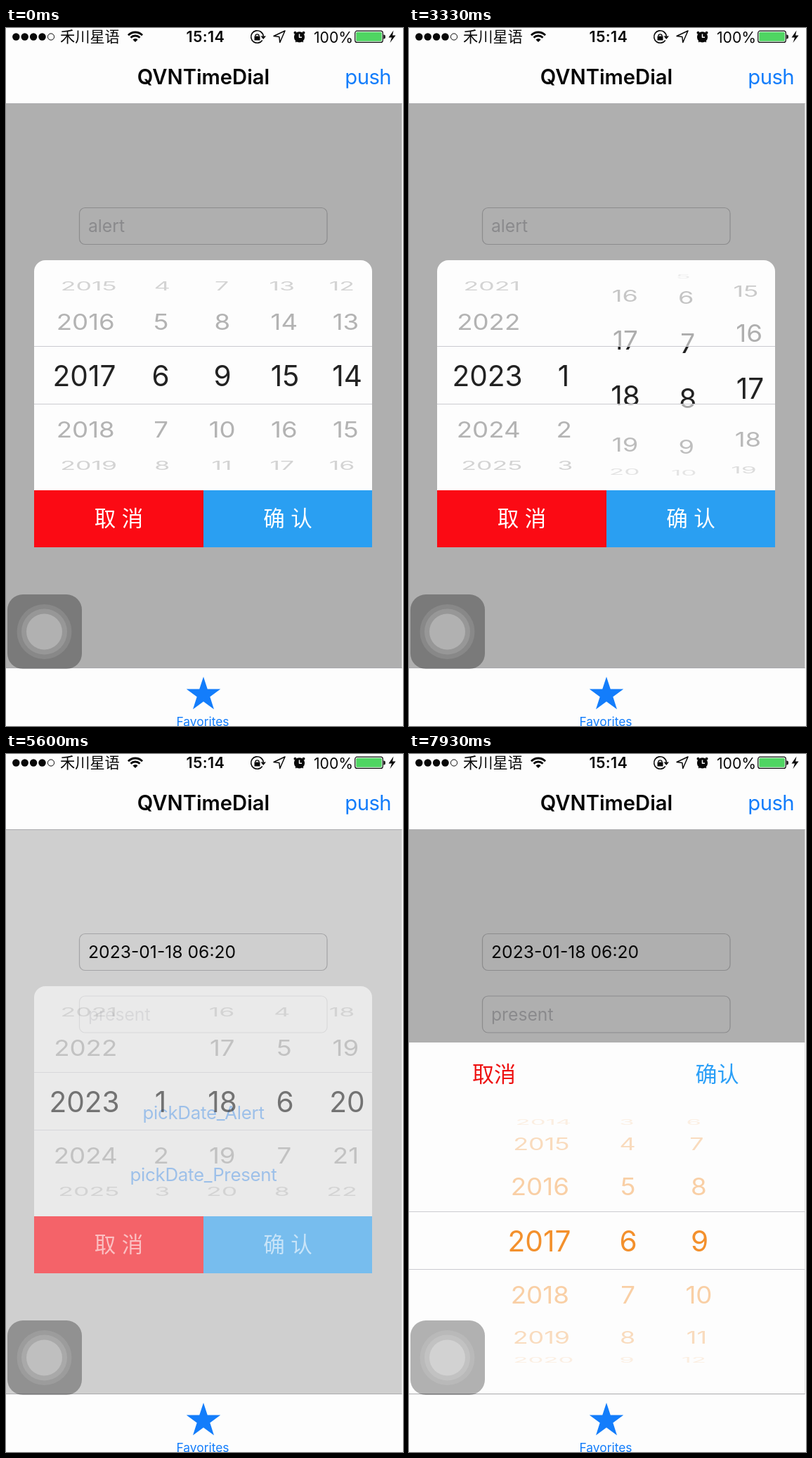
An HTML page with a canvas that plays this animation: 565 by 992 pixels, repeating every 8 s.

```html
<!DOCTYPE html>
<html lang="zh-CN">
<head>
<meta charset="utf-8">
<title>Date wheel</title>
<style>
html, body { margin: 0; width: 100%; height: 100%; overflow: hidden; background: #fdfdfd; }
canvas { display: block; width: 565px; height: 992px; }
</style>
</head>
<body>
<canvas id="stage"></canvas>
<script>
const W = 565, H = 992, LOOP = 8000;
const EDGE = 563.5, MID = 281, NAV = 107, TAB = 910, SHEET = 410;
const FONT = 'Inter, "Noto Sans CJK SC", "Noto Sans CJK", sans-serif';
const PAPER = '#fdfdfd', BLUE = '#137dfb', INK = '#222222';

const canvas = document.getElementById('stage');
const ctx = canvas.getContext('2d');
const ratio = window.devicePixelRatio || 1;
canvas.width = Math.round(W * ratio);
canvas.height = Math.round(H * ratio);

const clamp = x => Math.max(0, Math.min(1, x));
const ramp = (t, from, to) => clamp((t - from) / (to - from));
const easeOut = x => 1 - Math.pow(1 - x, 3);

// Smooth curve through [time, value] keys; flat at the ends and at turning points.
function track(keys) {
  const slope = i => (keys[i + 1][1] - keys[i][1]) / (keys[i + 1][0] - keys[i][0]);
  const tangents = keys.map((_, i) => {
    if (i === 0 || i === keys.length - 1) return 0;
    const a = slope(i - 1), b = slope(i);
    return a * b <= 0 ? 0 : 2 * a * b / (a + b);
  });
  return t => {
    if (t <= keys[0][0]) return keys[0][1];
    const i = keys.findIndex((key, n) => n < keys.length - 1 && t < keys[n + 1][0]);
    if (i < 0) return keys[keys.length - 1][1];
    const span = keys[i + 1][0] - keys[i][0];
    const u = (t - keys[i][0]) / span, u2 = u * u, u3 = u2 * u;
    return (2 * u3 - 3 * u2 + 1) * keys[i][1] + (u3 - 2 * u2 + u) * span * tangents[i]
      + (3 * u2 - 2 * u3) * keys[i + 1][1] + (u3 - u2) * span * tangents[i + 1];
  };
}

const alertColumns = [
  { x: 111.5, min: 1970, max: 2100, at: track([[250, 2017], [1400, 2021.6], [2200, 2022.83], [2600, 2023]]) },
  { x: 220, min: 1, max: 12, at: track([[1450, 6], [1950, 0.75], [2200, 0.96], [2350, 1]]) },
  { x: 308, min: 1, max: 31, at: track([[1850, 9], [2200, 13.18], [3330, 17.64], [3650, 18]]) },
  { x: 397, min: 0, max: 23, at: track([[2500, 15], [3330, 7.59], [4100, 6]]) },
  { x: 485.5, min: 0, max: 59, at: track([[2900, 14], [3330, 16.77], [4400, 20]]) }
];
const sheetColumns = [
  { x: 185.5, min: 1970, max: 2100, at: () => 2017 },
  { x: 312, min: 1, max: 12, at: () => 6 },
  { x: 413.5, min: 1, max: 31, at: () => 9 }
];

function text(str, x, y, size, color, { weight = 400, align = 'center', spacing = 0 } = {}) {
  ctx.font = `${weight} ${size}px ${FONT}`;
  ctx.letterSpacing = `${spacing}px`;
  ctx.textAlign = align;
  ctx.textBaseline = 'alphabetic';
  ctx.fillStyle = color;
  ctx.fillText(str, x, y + size * 0.3635);
}

function rect(x, y, w, h, color) {
  ctx.fillStyle = color;
  ctx.fillRect(x, y, w, h);
}

function disc(x, y, r, color) {
  ctx.beginPath();
  ctx.arc(x, y, r, 0, Math.PI * 2);
  ctx.fillStyle = color;
  ctx.fill();
}

function arc(x, y, r, from, to, color, width) {
  ctx.beginPath();
  ctx.arc(x, y, r, from, to);
  ctx.strokeStyle = color;
  ctx.lineWidth = width;
  ctx.stroke();
}

function path(points, closed = true) {
  ctx.beginPath();
  points.forEach(([x, y]) => ctx.lineTo(x, y));
  if (closed) ctx.closePath();
}

function box(x, y, w, h, radii) {
  ctx.beginPath();
  ctx.roundRect(x, y, w, h, radii);
}

function clipped(x, y, w, h, draw) {
  ctx.save();
  ctx.beginPath();
  ctx.rect(x, y, w, h);
  ctx.clip();
  draw();
  ctx.restore();
}

// Rows lie on a drum seen with slight perspective.
function drawRows(wheel, t, size, color, fade) {
  for (const col of wheel.columns) {
    const value = col.at(t);
    const first = Math.max(col.min, Math.ceil(value - 4));
    const last = Math.min(col.max, Math.floor(value + 4));
    for (let n = first; n <= last; n++) {
      const angle = (n - value) * wheel.step * Math.PI / 180;
      if (Math.abs(angle) > 1.4) continue;
      const cos = Math.cos(angle);
      const depth = 2040 / (2040 + wheel.radius * (1 - cos));
      ctx.save();
      ctx.globalAlpha *= fade ? fade * cos : 1;
      ctx.translate(MID + (col.x - MID) * depth, wheel.y + wheel.radius * Math.sin(angle) * depth);
      ctx.scale(depth, depth * cos);
      text(String(n), 0, 0, size, color);
      ctx.restore();
    }
  }
}

function drawWheel(wheel, t) {
  const { left, right, top, bottom, y, color } = wheel;
  const width = right - left, lens = 41;
  const faint = () => drawRows(wheel, t, 37, color, wheel.fade);
  clipped(left, top, width, y - lens - top, faint);
  clipped(left, y + lens, width, bottom - y - lens, faint);
  clipped(left, y - lens, width, lens * 2, () => drawRows(wheel, t, 40.6, color));
  rect(left, y - lens - 1, width, 1, '#cbcbd0');
  rect(left, y + lens - 1, width, 1, '#cbcbd0');
}

const alertWheel = {
  columns: alertColumns, y: 494, radius: 152, step: 30.4, color: INK, fade: 0.39,
  left: 40, right: 521, top: 330, bottom: 657
};
const sheetWheel = {
  columns: sheetColumns, y: 692, radius: 188, step: 24.4, color: '#f3902c', fade: 0.46,
  left: 0, right: EDGE, top: 500, bottom: TAB
};

function drawField(y, label, color) {
  box(104.5, y + 0.5, 352.5, 52, 8);
  ctx.strokeStyle = '#cacacc';
  ctx.lineWidth = 1.2;
  ctx.stroke();
  text(label, 117, y + 26.5, 24.7, color, { align: 'left' });
}

function drawPage(t) {
  const filled = t >= 5500;
  drawField(255, filled ? '2023-01-18 06:20' : 'alert', filled ? '#0a0a0a' : '#c7c7cb');
  drawField(343.5, 'present', '#c7c7cb');
  text('pickDate_Alert', MID, 510, 25.9, BLUE, { spacing: -0.3 });
  ctx.save();
  ctx.globalAlpha = 1 - 0.76 * (ramp(t, 6470, 6520) - ramp(t, 6700, 6900));
  text('pickDate_Present', MID, 598, 25.9, BLUE, { spacing: -0.3 });
  ctx.restore();
}

function drawDim(amount) {
  rect(0, NAV, EDGE, TAB - NAV, `rgba(0,0,0,${0.31 * amount})`);
}

function drawAlert(t) {
  box(40, 330, 481, 408, [16, 16, 0, 0]);
  ctx.fillStyle = PAPER;
  ctx.fill();
  drawWheel(alertWheel, t);
  rect(40, 657, 241, 81, '#fb0a14');
  rect(281, 657, 240, 81, '#2a9ff2');
  text('取 消', 160.5, 697, 30.5, '#fff');
  text('确 认', 401, 697, 30.5, '#fff');
}

function drawSheet(t, shift) {
  clipped(0, NAV, EDGE, TAB - NAV, () => {
    ctx.translate(0, shift);
    rect(0, SHEET, EDGE, TAB - SHEET, PAPER);
    text('取消', 121, 455, 31, '#ee1111');
    text('确认', 438.5, 455, 31, '#2b9ff7');
    drawWheel(sheetWheel, t);
  });
}

function drawStatus() {
  const black = '#080808';
  for (let i = 0; i < 4; i++) disc(14.3 + i * 12.4, 12.5, 5.2, black);
  arc(64, 12.5, 4.6, 0, Math.PI * 2, black, 1);
  text('禾川星语', 77, 12.5, 21.2, black, { align: 'left' });

  const up = -Math.PI / 2, spread = 0.8;
  ctx.beginPath();
  ctx.moveTo(184, 20);
  ctx.arc(184, 20, 5, up - spread, up + spread);
  ctx.fillStyle = black;
  ctx.fill();
  for (const r of [9, 14]) arc(184, 20, r, up - spread, up + spread, black, 2.8);

  text('15:14', 284, 12.5, 21.6, black, { weight: 600, spacing: 0.4 });

  arc(357.5, 12.5, 8.8, 0.6, Math.PI * 2 - 0.1, black, 1.6);
  path([[362.5, 11.5], [370, 11.5], [366.2, 16]]);
  ctx.fill();
  rect(353.5, 11.5, 8, 6, black);
  arc(357.5, 11.5, 2.6, Math.PI, Math.PI * 2, black, 1.4);

  path([[397, 4], [381, 11.5], [388.8, 12.4], [389.8, 20.5]]);
  ctx.lineWidth = 1.5;
  ctx.lineJoin = 'round';
  ctx.stroke();

  disc(417.5, 12.8, 7.6, black);
  for (const side of [-1, 1]) {
    disc(417.5 + side * 6, 6.8, 2, black);
    path([[417.5 + side * 4, 18], [417.5 + side * 5.2, 20]], false);
    ctx.lineWidth = 1.6;
    ctx.stroke();
  }
  path([[417.5, 8.5], [417.5, 13.3], [421, 13.3]], false);
  ctx.strokeStyle = PAPER;
  ctx.lineWidth = 1.5;
  ctx.stroke();

  text('100%', 438, 12.8, 21.2, black, { align: 'left' });
  box(496.7, 4.2, 39.6, 16.2, 3);
  ctx.strokeStyle = black;
  ctx.lineWidth = 1.2;
  ctx.stroke();
  box(498.3, 5.8, 36.4, 13, 1.5);
  ctx.fillStyle = '#4fd562';
  ctx.fill();
  box(537.4, 9.4, 2.4, 6, [0, 2, 2, 0]);
  ctx.fillStyle = black;
  ctx.fill();
  path([[551.5, 3.5], [544.5, 13.5], [549, 13.5], [546.5, 21], [554.5, 10.5], [550, 10.5]]);
  ctx.fill();
}

function drawBars() {
  rect(0, 0, W, NAV, PAPER);
  rect(0, NAV, EDGE, 1, '#aaaaad');
  drawStatus();
  text('QVNTimeDial', MID, 69, 29.2, '#050505', { weight: 600 });
  text('push', 548, 69, 29.3, BLUE, { align: 'right', spacing: -0.6 });

  rect(0, TAB, W, H - TAB, PAPER);
  rect(0, TAB - 1, EDGE, 1, '#aaaaad');
  path(Array.from({ length: 10 }, (_, i) => {
    const r = i % 2 ? 9.8 : 25.5, a = (i / 5 - 0.5) * Math.PI;
    return [MID + r * Math.cos(a), 947.5 + r * Math.sin(a)];
  }));
  ctx.fillStyle = BLUE;
  ctx.fill();
  text('Favorites', 280, 985.5, 17.4, BLUE);
}

function drawTouchButton() {
  box(2, 805, 106, 106, 22);
  ctx.fillStyle = 'rgba(0,0,0,0.3)';
  ctx.fill();
  disc(54.5, 858, 39, 'rgba(255,255,255,0.1)');
  disc(54.5, 858, 32.5, 'rgba(255,255,255,0.13)');
  disc(54.5, 858, 25.5, 'rgba(255,255,255,0.25)');
}

function draw(t) {
  ctx.setTransform(ratio, 0, 0, ratio, 0, 0);
  rect(0, 0, W, H, PAPER);
  drawPage(t);

  const alertAlpha = 1 - ramp(t, 5500, 5750);
  if (alertAlpha > 0) {
    drawDim(alertAlpha);
    ctx.save();
    ctx.globalAlpha = alertAlpha;
    drawAlert(t);
    ctx.restore();
  }

  const rise = easeOut(ramp(t, 6800, 7200));
  if (rise > 0) {
    drawDim(rise);
    drawSheet(t, (TAB - SHEET) * (1 - rise));
  }

  drawBars();
  drawTouchButton();
}

const start = performance.now();
function tick() {
  draw((performance.now() - start) % LOOP);
  requestAnimationFrame(tick);
}
tick();
</script>
</body>
</html>
```
